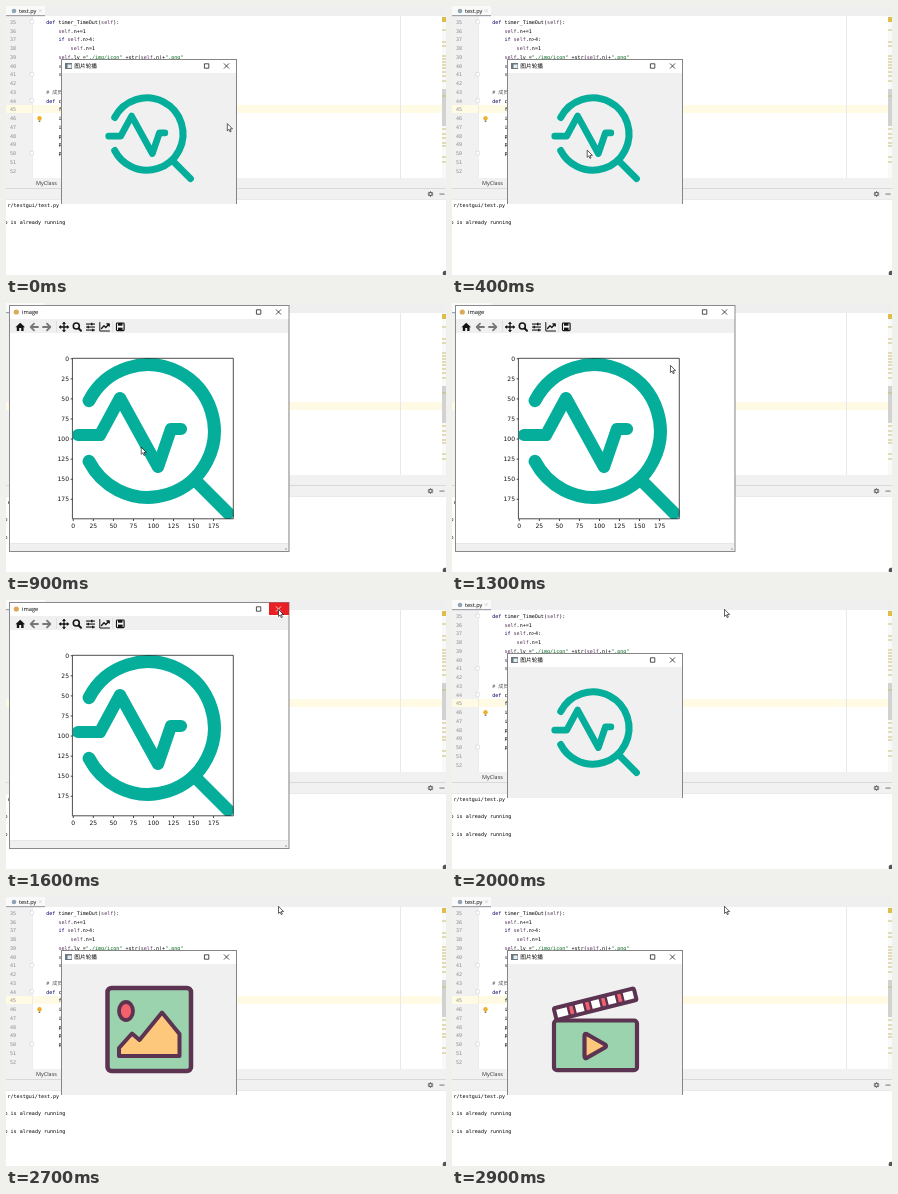
These frames come from a looping animation (440x269 px, 3.9 s). An HTML page with a canvas:

```html
<!DOCTYPE html>
<html lang="en">
<head>
<meta charset="utf-8">
<title>Icon carousel</title>
<style>
html, body { margin: 0; overflow: hidden; background: #fff; }
canvas { display: block; }
</style>
</head>
<body>
<canvas id="stage" width="440" height="269"></canvas>
<script>
const LOOP = 3900;
const ctx = document.getElementById('stage').getContext('2d');
const SANS = '"Open Sans", "Noto Sans CJK SC", sans-serif';
const MONO = '"DejaVu Sans Mono", "Noto Sans CJK SC", monospace';
const PLOT = '"DejaVu Sans", sans-serif';
const TEAL = '#04ae9b', PLUM = '#5c3350', MINT = '#9ad3ae', SAND = '#fdc77c', ROSE = '#f4616d';
const CHAR = 3.05, ROW = 8.75;

const CODE = [
  '    def timer_TimeOut(self):',
  '        self.n+=1',
  '        if self.n>4:',
  '            self.n=1',
  '        self.lv ="./img/icon" +str(self.n)+".png"',
  '        self', '        self', '',
  '    # 成员', '    def change(self):',
  '        fig', '        img', '        img', '        plt', '        plt', '        plt'
];
const WARNINGS = [24, 36, 40, 50, 53, 56, 59, 62, 66, 70, 75, 90, 123, 128, 132, 137, 140, 151, 156];

function rect(x, y, w, h, color) {
  ctx.fillStyle = color;
  ctx.fillRect(x, y, w, h);
}

function text(s, x, y, size, font, color = '#000', align = 'left') {
  ctx.font = size + 'px ' + font;
  ctx.fillStyle = color;
  ctx.textAlign = align;
  ctx.fillText(s, x, y);
}

function paint(path, fill, stroke, width = 1) {
  if (fill) { ctx.fillStyle = fill; ctx.fill(path); }
  if (stroke) { ctx.strokeStyle = stroke; ctx.lineWidth = width; ctx.stroke(path); }
}

function shape(d, fill, stroke, width) {
  paint(new Path2D(d), fill, stroke, width);
}

function roundRect(x, y, w, h, r, fill, stroke, width) {
  const p = new Path2D();
  p.roundRect(x, y, w, h, r);
  paint(p, fill, stroke, width);
}

function ellipse(x, y, rx, ry, fill, stroke, width) {
  const p = new Path2D();
  p.ellipse(x, y, rx, ry, 0, 0, 7);
  paint(p, fill, stroke, width);
}

function at(x, y, scale, angle, draw) {
  ctx.save();
  ctx.translate(x, y);
  ctx.rotate(angle);
  ctx.scale(scale, scale);
  draw();
  ctx.restore();
}

function codeLine(line, y) {
  const comment = line.includes('#');
  for (const m of line.matchAll(/#.*|"[^"]*"|\w+|[^\w\s"]+/g)) {
    const word = m[0];
    const color = comment ? '#555' : word[0] === '"' ? '#00651a'
      : /^(def|if)$/.test(word) ? '#000060' : word === 'self' ? '#54305a' : '#000';
    text(word, 28 + m.index * CHAR, y, 5.06, MONO, color);
  }
}

function editor(t) {
  rect(0, 0, 440, 269, '#fff');
  rect(0, 10, 26, 162, '#f1f1f1');
  rect(0, 99, 436, 8, '#fffae3');
  rect(26, 10, .6, 162, '#e2e2e2');
  rect(394, 10, 1, 162, '#e8e8e8');
  for (let i = 0; i < 18; i++) {
    const y = 17.8 + i * ROW;
    text(35 + i, 10, y, 5, MONO, '#8a8a8a', 'right');
    if (CODE[i]) codeLine(CODE[i], y);
  }
  for (const i of [0, 6, 9, 15])
    roundRect(24, 14 + i * ROW, 3.6, 3.6, .6, '#fff', '#d4d4d4', .6);
  ellipse(33.5, 112.3, 2.2, 2.4, '#eeb12c');
  rect(32.7, 114.6, 1.6, 1.4, '#777');

  rect(0, 0, 440, 10, '#efefef');
  rect(0, 0, 39, 10, '#fafafa');
  rect(0, 9, 39, 1.2, '#a0a4a8');
  ellipse(8, 5, 2.3, 2.3, '#8fa5b5');
  text('test.py', 13, 7, 5.6, SANS);
  shape('M33 3.5l2.5 2.5m0-2.5l-2.5 2.5', null, '#bbb', .5);

  rect(436, 10, 4, 162, '#f9f9f9');
  rect(436, 83, 4, 37, '#d2d2d2');
  rect(436, 11, 4, 5, '#dfbd49');
  for (const y of WARNINGS) rect(436, y - .5, 4, 1, '#cbbd72');

  rect(0, 172, 440, 22, '#f1f1f1');
  rect(0, 182, 440, .8, '#d4d4d4');
  text('MyClass', 30, 179, 5.5, SANS, '#333');
  ellipse(424.5, 188, 1.7, 1.7, null, '#666', 1.2);
  for (let k = 0; k < 8; k++)
    at(424.5, 188, 1, k * Math.PI / 4, () => rect(-.4, -2.9, .8, 1, '#666'));
  rect(433.5, 187.6, 5, .9, '#666');
  rect(0, 193.5, 440, .5, '#e2e2e2');

  const runs = t < 800 ? 1 : 2;
  text('r/testgui/test.py', 1.5, 201, 5.06, MONO);
  for (let i = 0; i < runs; i++)
    text('p is already running', -1.5, 218 + i * 17.6, 5.06, MONO);
  ellipse(439, 267.5, 2.3, 2.8, '#555');
}

function titleButtons(x, y, color = '#222') {
  ctx.strokeStyle = '#222';
  ctx.lineWidth = .8;
  ctx.strokeRect(x - 21.7, y - 2.2, 4, 4.4);
  shape(`M${x - 2.3} ${y - 2.3}l4.6 4.6m0-4.6l-4.6 4.6`, null, color, .8);
}

function pulseLens() {
  const ring = new Path2D();
  ring.arc(75, 73, 66.3, -Math.PI + .476, Math.PI - .476);
  paint(ring, null, TEAL, 13);
  shape('M5 77H27L47 40L85 109L98 71H108', null, TEAL, 12.2);
  shape('M122 122L155 155', null, TEAL, 12.6);
}

function photo() {
  roundRect(101.5, 91, 83.5, 83, 4, MINT, PLUM, 4.5);
  ellipse(120, 114, 7, 9, ROSE, PLUM, 3.8);
  shape('M113 159V151L126 136.5L133.5 143L156 115.5L173.5 137V159Z', SAND, PLUM, 4);
}

function clapper() {
  roundRect(102, 123.5, 83, 49.7, 3, MINT, PLUM, 4.2);
  shape('M132.5 139V159Q132.5 162 135 160.8L153 150.5Q155 149 153 147.5L135 137.2Q132.5 136 132.5 139Z', SAND, PLUM, 4.2);
  at(101.7, 111.3, 1, -.245, () => {
    rect(0, 0, 82.5, 12, '#fff');
    for (let x = 14; x < 70; x += 16.5)
      shape(`M${x} 0h6v12h-6z`, ROSE, PLUM, 2.4);
    roundRect(0, 0, 82.5, 12, 1.5, null, PLUM, 4);
  });
}

function carousel(t) {
  rect(55, 53, 176, 145, '#858585');
  rect(56, 54, 174, 13, '#fff');
  rect(56, 67, 174, 131, '#f0f0f0');
  rect(59, 57, 7, 6, '#6c7880');
  rect(61.5, 58.5, 4, 3.5, '#e4eef2');
  text('图片轮播', 68.3, 62.2, 5.7, SANS);
  titleButtons(220.5, 60);
  if (t < 2300) at(100, 88.2, .545, 0, pulseLens);
  else if (t < 2900) photo();
  else clapper();
}

function toolbar() {
  const ink = '#151515', grey = '#777';
  shape('M9.5 24.3L14.2 19.8L19 24.3H17.6V28H15.2V25H13.2V28H10.8V24.3Z', ink);
  shape('M32 24H25M28 20.7L24.7 24L28 27.3', null, grey, 1.8);
  shape('M37 24H44M41 20.7L44.3 24L41 27.3', null, grey, 1.8);
  shape('M54 24H62M58 20V28', null, ink, 1.3);
  shape('M58 18.8l2 2.3h-4zM58 29.2l2-2.3h-4zM52.8 24l2.3-2v4zM63.2 24l-2.3-2v4z', ink);
  ellipse(70.3, 23, 3, 3, null, ink, 1.6);
  shape('M72.7 25.5L75 27.8', null, ink, 2);
  for (let i = 0; i < 3; i++) {
    rect(80, 20.5 + i * 3, 9, 1.1, ink);
    rect([85, 81.5, 86][i], 19.8 + i * 3, 1.5, 2.5, ink);
  }
  shape('M93.8 19.5V28H103.5', null, ink, 1);
  shape('M95.5 25.5L98 22.8L99.8 24.5L103 21M100.8 20.8H103.2V23', null, ink, 1.3);
  roundRect(110.5, 20, 7.6, 7.6, .8, '#fff', ink, 1.2);
  rect(112, 20, 4.5, 2.7, ink);
  rect(112, 24.6, 4.6, 2.8, ink);
  rect(50, 18, .6, 11, '#d5d5d5');
  rect(106.5, 18, .6, 11, '#d5d5d5');
}

function plot() {
  rect(4, 30, 278, 210, '#fff');
  ctx.save();
  ctx.beginPath();
  ctx.rect(67, 55, 160.5, 161);
  ctx.clip();
  at(67, 55, 1, 0, pulseLens);
  ctx.restore();
  ctx.strokeStyle = '#222';
  ctx.lineWidth = .8;
  ctx.strokeRect(66.8, 55.3, 160.5, 160.5);
  for (let v = 0; v < 200; v += 25) {
    const d = v * .8025;
    rect(64.6, 55.4 + d, 2, .8, '#222');
    rect(66.8 + d, 216, .8, 2, '#222');
    text(v, 63, 58 + d, 6, PLOT, '#111', 'right');
    text(v, 67.2 + d, 225, 6, PLOT, '#111', 'center');
  }
}

function figure(t, hover) {
  rect(3, 2, 280.5, 247, '#8a8a8a');
  rect(4, 3, 278.5, 13, '#fff');
  rect(4, 16, 278.5, 232, '#f0f0f0');
  ellipse(10.3, 9, 2.6, 2.6, '#dda957');
  text('image', 16, 11.2, 5.7, SANS);
  if (hover) rect(263, 2.5, 20, 12.5, '#e81f24');
  titleButtons(272.5, 9, hover ? '#fff' : '#222');
  toolbar();
  if (t < 900) rect(3.5, 30, 279.5, 210, '#000');
  else plot();
  rect(4, 240, 278, .5, '#ddd');
  rect(279, 245, 2, 2, '#c4c4c4');
}

// Straight run between two points over [from, to], eased at both ends.
function glide(t, from, to, a, b) {
  const k = Math.min(1, Math.max(0, (t - from) / (to - from)));
  const e = k * k * (3 - 2 * k);
  return a.map((v, i) => v + (b[i] - v) * e);
}

function pointer(t) {
  return t < 900
    ? glide(t, 0, 400, [221.3, 118], [135.2, 144.5])
    : glide(t, 900, 1600, [135.2, 144.5], [272.5, 9.7]);
}

function frame(now) {
  const t = Math.floor(now % LOOP / 100) * 100;
  const [x, y] = pointer(t);
  editor(t);
  if (t >= 800 && t < 2000) figure(t, x > 263 && y < 15);
  else carousel(t);
  at(x, y, .94, 0, () => shape('M0 0V7.2L1.7 5.7L2.9 8.4L4.1 7.9L2.9 5.2H5.1Z', '#fff', '#111', .7));
  requestAnimationFrame(stamp => frame(Math.max(0, stamp - start)));
}

ctx.lineCap = ctx.lineJoin = 'round';
ctx.textRendering = 'geometricPrecision';
const start = performance.now();
frame(0);
</script>
</body>
</html>
```
